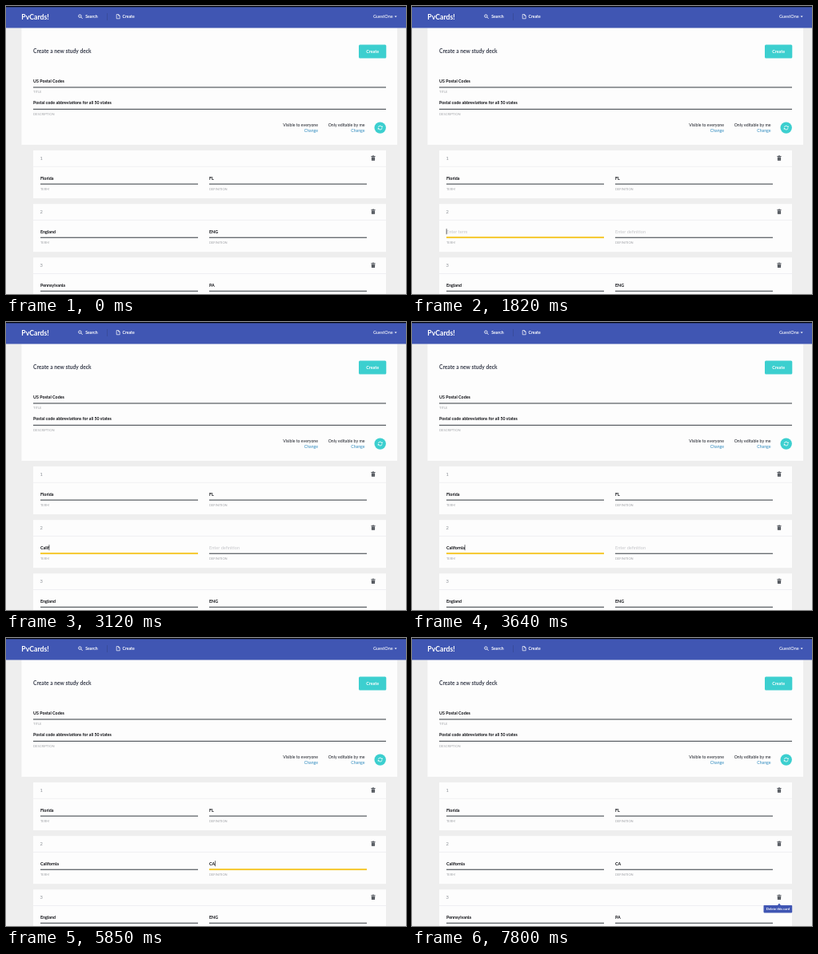
An HTML page with a canvas for the animation above (8000 ms loop, 500 by 361 pixels).

```html
<!DOCTYPE html>
<html lang="en">
<head>
<meta charset="utf-8">
<title>Study deck editor</title>
<style>
  html, body { margin: 0; width: 100%; height: 100%; overflow: hidden; background: #eee; }
  canvas { display: block; width: 500px; height: 361px; }
</style>
</head>
<body>
<canvas id="stage"></canvas>
<script>
const W = 500, H = 361, LOOP = 8000, STEP = 130;
const INSERT = 650, TYPE = 2600, TAB = 3900, HOVER = 6630, BLUR = 7670, REMOVE = 7800;
const CARET_OFF = [[1170, 1820], [2340, 2600], [4420, 4550], [5330, 5850], [6370, 6890], [7410, LOOP]];
const BLUE = '#4056b3', TEAL = '#3ccfcf', YELLOW = '#f6c82d';
const INK = '#0c0d12', LINE = '#454b50', LINK = '#3f94c4', PAPER = '#fdfdfd', LABEL = '#a2a4a8';
const CARD_Y = 181, PITCH = 67.1, CARD_H = 60;

const canvas = document.getElementById('stage');
const ctx = canvas.getContext('2d');
const scale = window.devicePixelRatio || 1;
canvas.width = W * scale;
canvas.height = H * scale;

function rect(x, y, w, h, color) {
  ctx.fillStyle = color;
  ctx.fillRect(x, y, w, h);
}

function rounded(x, y, w, h, r, color) {
  ctx.fillStyle = color;
  ctx.beginPath();
  ctx.roundRect(x, y, w, h, r);
  ctx.fill();
}

function stroke(color, width, path) {
  ctx.strokeStyle = color;
  ctx.lineWidth = width;
  ctx.beginPath();
  path();
  ctx.stroke();
}

function text(str, x, y, size, color, weight = 400, align = 'left') {
  ctx.font = `${weight} ${size}px Lato, "Open Sans", sans-serif`;
  ctx.textAlign = align;
  ctx.fillStyle = color;
  ctx.fillText(str, x, y);
  return ctx.measureText(str).width;
}

function searchIcon(x, y) {
  stroke('#fff', 0.9, () => {
    ctx.arc(x, y, 1.7, 0, 7);
    ctx.moveTo(x + 1.3, y + 1.3);
    ctx.lineTo(x + 3.2, y + 3.2);
  });
}

function pageIcon(x, y) {
  stroke('#fff', 0.7, () => {
    ctx.moveTo(x, y);
    ctx.lineTo(x + 2.4, y);
    ctx.lineTo(x + 4, y + 1.7);
    ctx.lineTo(x + 4, y + 5.3);
    ctx.lineTo(x, y + 5.3);
    ctx.closePath();
    ctx.moveTo(x + 2.4, y);
    ctx.lineTo(x + 2.4, y + 1.7);
    ctx.lineTo(x + 4, y + 1.7);
  });
}

function trashIcon(x, y) {
  const color = '#454a52';
  rect(x - 1, y - 3.2, 2, 0.8, color);
  rect(x - 2.6, y - 2.6, 5.2, 1, color);
  rounded(x - 2.1, y - 1.2, 4.2, 4.2, 0.5, color);
  for (const dx of [-1, 0, 1]) rect(x + dx - 0.15, y - 0.6, 0.3, 2.9, '#aaa');
}

function swapButton(x, y) {
  ctx.fillStyle = TEAL;
  ctx.beginPath();
  ctx.arc(x, y, 7.2, 0, 7);
  ctx.fill();
  for (const turn of [0, Math.PI]) {
    ctx.save();
    ctx.translate(x, y);
    ctx.rotate(turn);
    stroke('#fff', 0.8, () => ctx.arc(0, 0, 2.4, 3.3, 5.8));
    ctx.fillStyle = '#fff';
    ctx.beginPath();
    ctx.moveTo(2.9, -2.4);
    ctx.lineTo(2.9, -0.3);
    ctx.lineTo(0.9, -0.5);
    ctx.fill();
    ctx.restore();
  }
}

function header() {
  rect(0, 0, W, 27.5, BLUE);
  rect(0, 0, W, 1.3, '#050508');
  text('PvCards!', 19.3, 16.6, 8.7, '#fff', 700);
  searchIcon(92.4, 12.6);
  text('Search', 99.2, 15.1, 5.2, '#fff', 700);
  rect(126, 9, 1, 9, '#394c9c');
  pageIcon(138.2, 10.5);
  text('Create', 145.6, 15.1, 5.1, '#fff', 700);
  text('GuestOne', 459, 15.1, 5.5, '#fff', 500);
  ctx.beginPath();
  ctx.moveTo(485.6, 12.6);
  ctx.lineTo(488.6, 12.6);
  ctx.lineTo(487.1, 14.2);
  ctx.fill();
}

function deckPanel() {
  rect(19.5, 27.5, 469.5, 146.5, PAPER);
  text('Create a new study deck', 34, 59.3, 6.65, '#363b4a', 700);
  rounded(441, 48.5, 34.3, 16.9, 1.5, TEAL);
  text('Create', 458.2, 58.9, 5.4, '#fff', 700, 'center');

  text('US Postal Codes', 34, 95.7, 5.35, INK, 700);
  rect(34, 101.4, 441, 1.1, LINE);
  text('TITLE', 34, 109, 4.1, LABEL);
  text('Postal code abbreviations for all 50 states', 34, 122.9, 5.3, INK, 700);
  rect(34, 128.8, 441, 1.1, LINE);
  text('DESCRIPTION', 34, 136.6, 4.1, LABEL);

  [['Visible to everyone', 390], ['Only editable by me', 448.5]].forEach(([label, x]) => {
    text(label, x, 151.2, 5.2, '#2b2e36', 500, 'right');
    text('Change', x, 158.2, 5.2, LINK, 500, 'right');
  });
  swapButton(467.7, 152.6);
}

function field(x, y, label, hint, value, focused, caret) {
  const base = y + 36.5;
  const width = value
    ? text(value, x, base, 5.35, INK, 700)
    : (text(hint, x, base, 5.6, '#c5c6ca'), 0);
  if (focused && caret) rect(x + width - 0.2, base - 5.4, 0.6, 7, INK);
  if (focused) rect(x, y + 41, 197, 2, YELLOW);
  else rect(x, y + 41.6, 197, 1.1, LINE);
  text(label, x, y + 49.8, 4, LABEL);
}

function card(number, [term, definition], focus, caret) {
  const y = CARD_Y + PITCH * (number - 1);
  rect(34, y, 441, CARD_H, PAPER);
  rect(34, y + 19.8, 441, 0.8, '#ededf0');
  text(number, 42.6, y + 11.7, 5.8, '#8c9097');
  trashIcon(459, y + 9.7);
  field(43, y, 'TERM', 'Enter term', term, focus === 'term', caret);
  field(254, y, 'DEFINITION', 'Enter definition', definition, focus === 'definition', caret);
}

function tooltip() {
  rounded(439.5, 335, 35.7, 9.4, 0.8, BLUE);
  ctx.beginPath();
  ctx.moveTo(456.8, 335.2);
  ctx.lineTo(459, 332.6);
  ctx.lineTo(461.2, 335.2);
  ctx.fill();
  text('Delete this card', 457.4, 341.1, 4.2, '#fff', 700, 'center');
}

function typedTerm(t) {
  if (t < TYPE) return '';
  const keys = Math.floor((t - TYPE) / STEP) + 1;
  return 'California'.slice(0, keys > 7 ? keys + 1 : keys);
}

function typedDefinition(t) {
  return t < 4550 ? '' : t < 4810 ? 'C' : 'CA';
}

function cards(t) {
  const deck = [['Florida', 'FL'], ['England', 'ENG'], ['Pennsylvania', 'PA']];
  if (t >= INSERT) deck.splice(1, 0, [typedTerm(t), typedDefinition(t)]);
  if (t >= REMOVE) deck.splice(2, 1);

  const focus = t < INSERT || t >= BLUR ? '' : t < TAB ? 'term' : 'definition';
  const caret = !CARET_OFF.some(([from, to]) => t >= from && t < to);
  deck.forEach((entry, i) => card(i + 1, entry, i === 1 ? focus : '', caret));
}

function draw(now) {
  const t = Math.floor((now % LOOP) / STEP) * STEP;
  ctx.setTransform(scale, 0, 0, scale, 0, 0);
  rect(0, 0, W, H, '#eee');
  deckPanel();
  header();
  cards(t);
  if (t >= HOVER) tooltip();
}

const start = performance.now();
function tick() {
  draw(performance.now() - start);
  requestAnimationFrame(tick);
}
tick();
</script>
</body>
</html>
```
